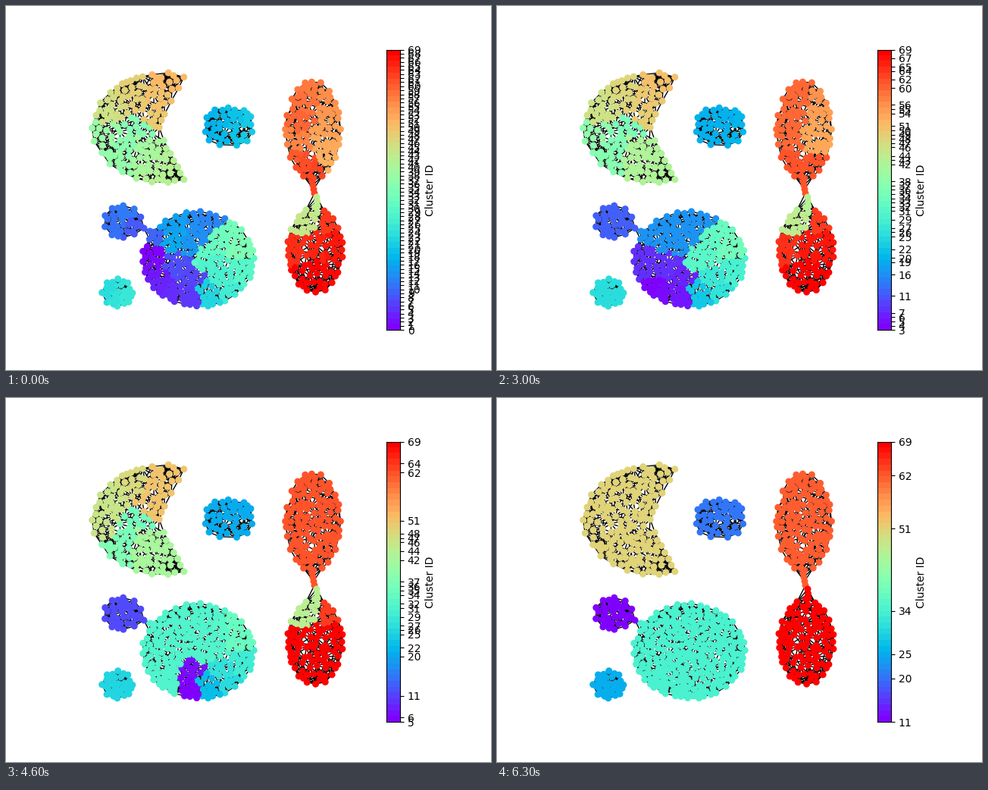
A matplotlib script that plays this animation: 640 px wide and 480 px high, repeating every 8000 ms.

```python
import numpy as np
import matplotlib.pyplot as plt
from matplotlib.animation import FuncAnimation
from matplotlib.collections import LineCollection
from matplotlib.path import Path

W, H, DPI = 640, 480, 100
STEP_MS, FRAMES = 100, 80
NEIGHBOURS = 10
DOT_AREA = 50
rng = np.random.default_rng(12)
cmap = plt.get_cmap("rainbow")


def line(a, b, n):
    return np.linspace(a, b, n)


def arc(cx, cy, rx, ry, angles, power=1):
    """Slightly uneven points on a (super)ellipse, angle 0 at the top."""
    s, c = np.sin(angles), np.cos(angles)
    wobble = 1 + rng.uniform(-0.02, 0.02, len(angles))
    return np.column_stack([cx + rx * wobble * np.sign(s) * np.abs(s) ** power,
                            cy - ry * wobble * np.sign(c) * np.abs(c) ** power])


def ring(cx, cy, rx, ry, n, power=1):
    angles = np.arange(n) * 2 * np.pi / n + rng.uniform(-0.06, 0.06, n)
    return arc(cx, cy, rx, ry, angles, power)


def moon():
    outer = arc(205, 161, 90, 72, np.linspace(0.34, -3.48, 17))
    y = np.linspace(212, 108, 7)
    inner = 202 + 33 * (np.abs(y - 161) / 65) ** 1.2
    return np.vstack([outer, np.column_stack([inner, y])])


def fill(rim, count, tail=None):
    """Rim, an optional tail, and evenly scattered dots inside."""
    pts = rim if tail is None else np.vstack([rim, tail])
    shape, lo, hi = Path(rim), rim.min(0), rim.max(0)
    while len(pts) < count:
        tries = rng.uniform(lo, hi, (30, 2))
        tries = tries[shape.contains_points(tries)]
        if len(tries):
            room = np.linalg.norm(tries[:, None] - pts[None], axis=2).min(1)
            pts = np.vstack([pts, tries[room.argmax()]])
    return pts


def label(pts, *runs):
    """Runs of ids (first, last) lie along a segment; dots take the closest."""
    ids = np.concatenate([np.arange(a, b + 1) for a, b, *_ in runs])
    seeds = np.vstack([line(p, q, b - a + 1) for a, b, p, q in runs])
    d = np.linalg.norm(pts[:, None] - seeds[None], axis=2)
    return pts, ids[d.argmin(1)]


def spot(k, p):
    return k, k, p, p


parts = [
    label(fill(moon(), 170),
          (35, 37, (178, 158), (140, 204)), spot(38, (128, 172)),
          (39, 42, (180, 185), (215, 215)),
          (45, 48, (130, 135), (163, 115)), (49, 51, (188, 145), (215, 100))),
    label(fill(ring(294, 159, 31, 25, 11, 0.75), 45),
          (17, 20, (268, 158), (318, 158))),
    label(fill(ring(154, 284, 25, 21, 10), 36, line((172, 291), (182, 293), 2)),
          spot(8, (174, 290)), (10, 11, (140, 284), (157, 272))),
    label(fill(ring(147, 378, 20, 18, 8), 34),
          (23, 25, (134, 372), (160, 384))),
    label(fill(ring(254, 334, 73, 62, 28), 273, line((190, 297), (190, 297), 1)),
          (0, 3, (188, 325), (196, 368)), (4, 5, (214, 385), (240, 385)),
          (6, 7, (247, 360), (228, 338)), spot(9, (194, 305)),
          (12, 14, (272, 285), (242, 316)), (15, 16, (215, 290), (222, 312)),
          (21, 22, (262, 372), (272, 385)), (26, 28, (290, 381), (270, 338)),
          spot(29, (314, 350)), (30, 32, (262, 324), (284, 302)),
          (33, 34, (295, 298), (308, 315))),
    label(fill(ring(405, 163, 36, 64, 20), 130, line((404, 231), (407, 247), 4)),
          (52, 56, (428, 205), (425, 118)), spot(57, (378, 178)),
          (58, 60, (405, 110), (385, 150)), (61, 63, (380, 200), (405, 222))),
    label(fill(ring(408, 322, 36, 56, 18), 106, line((410, 252), (411, 264), 3)),
          spot(43, (410, 257)), spot(44, (393, 287)), spot(64, (427, 280)),
          (65, 67, (385, 318), (432, 318)), (68, 69, (430, 352), (400, 352))),
]
pts = np.vstack([p for p, _ in parts])
ids = np.concatenate([i for _, i in parts])
part = np.repeat(np.arange(len(parts)), [len(p) for p, _ in parts])

# Clusters in the order in which they dissolve, one per step
ORDER = [24, 57, 41, 12, 63, 15, 53, 28, 61, 23, 9, 59, 0, 10, 58, 40, 8, 39,
         1, 14, 52, 30, 17, 21, 66, 13, 45, 2, 68, 18, 16, 38, 67, 7, 19, 65,
         60, 3, 50, 54, 49, 55, 56, 33, 43, 4, 44, 32, 5, 6, 22, 64, 26, 35,
         46, 27, 36, 29, 47, 37, 31, 42, 48]


def absorber(now, gone):
    """Closest cluster of the same part, higher ids first."""
    home = part[now == gone][0]
    mates = [k for k in np.unique(now[part == home]) if k != gone]
    mates = [k for k in mates if k > gone] or mates
    centre = pts[now == gone].mean(0)

    def gap(k):
        group = pts[now == k]
        radius = np.sqrt(len(group) * DOT_AREA / np.pi)
        return np.linalg.norm(group.mean(0) - centre) - radius

    return min(mates, key=gap)


states = [ids]
for gone in ORDER:
    now = states[-1].copy()
    if gone in now:
        now[now == gone] = absorber(now, gone)
    states.append(now)

dist = np.linalg.norm(pts[:, None] - pts[None], axis=2)
near = np.argsort(dist, axis=1)[:, 1:NEIGHBOURS + 1]
pairs = sorted({(min(i, j), max(i, j)) for i, row in enumerate(near) for j in row})

fig = plt.figure(figsize=(W / DPI, H / DPI), dpi=DPI, facecolor="white")
ax = fig.add_axes([0, 0, 1, 1])
ax.set(xlim=(0, W), ylim=(H, 0))
ax.axis("off")
ax.add_collection(LineCollection([pts[list(p)] for p in pairs],
                                 colors="black", linewidths=1, zorder=1))
nodes = ax.scatter(*pts.T, s=42, linewidths=0, zorder=2)

bar = fig.add_axes([501.6 / W, 0.11, 18.48 / W, 0.77])
bar.imshow(np.linspace(0, 1, 48)[:, None], cmap=cmap, aspect="auto",
           origin="lower", extent=(0, 1, 0, 1), interpolation="nearest")
bar.set_xticks([])
bar.yaxis.tick_right()
bar.yaxis.set_label_position("right")
bar.set_ylabel("Cluster ID")


def draw(frame):
    step = min(frame, len(ORDER))
    left = np.setdiff1d(np.arange(70), ORDER[:step])
    lo, hi = left[0], left[-1]
    nodes.set_facecolor(cmap((states[step] - lo) / (hi - lo)))
    bar.set_yticks((left - lo) / (hi - lo), [str(k) for k in left])
    return nodes,


anim = FuncAnimation(fig, draw, frames=FRAMES, interval=STEP_MS,
                     init_func=lambda: draw(0), repeat=True, repeat_delay=0)
plt.show()
```
